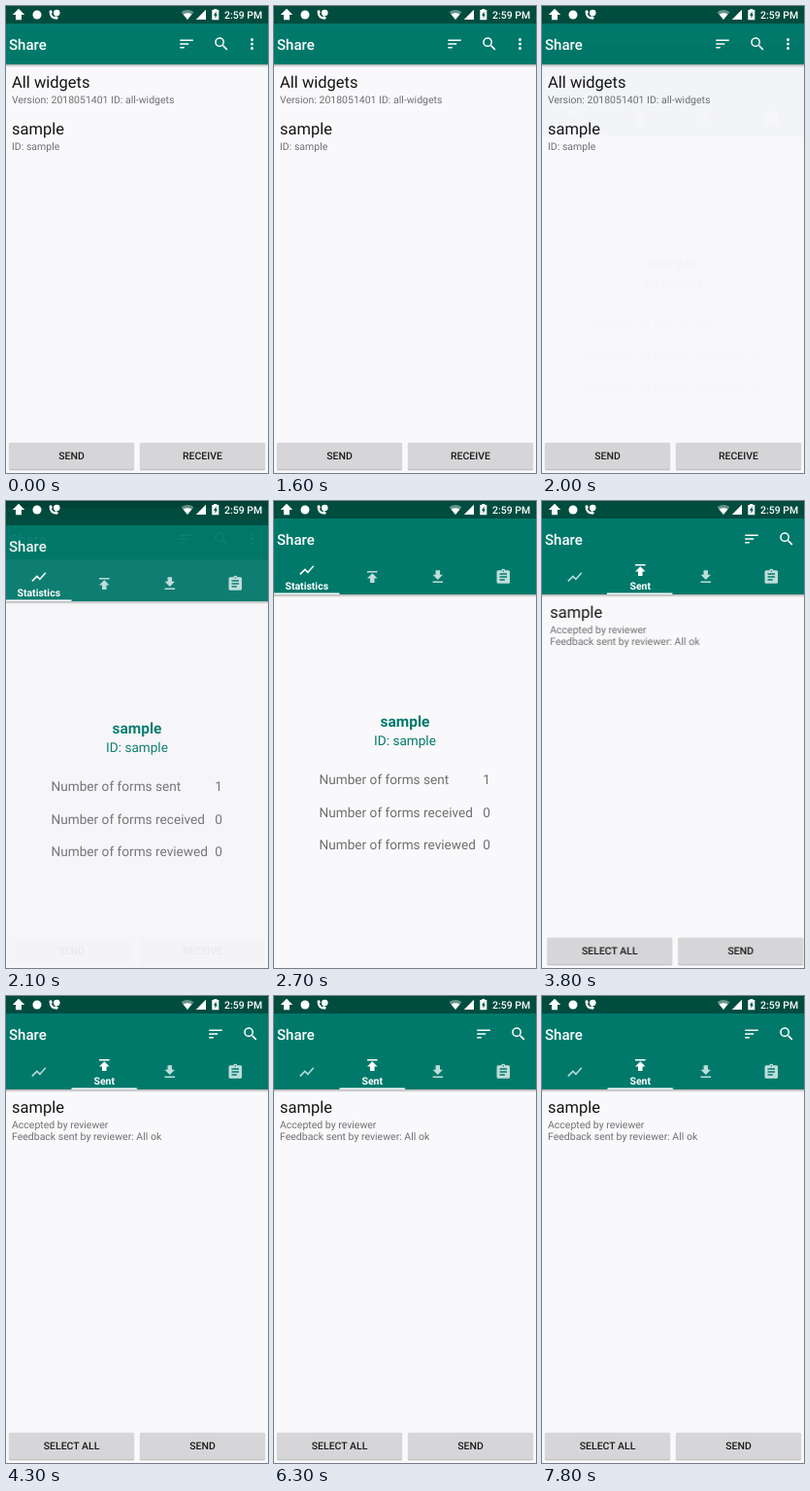
An HTML page that plays this animation: 270 px wide and 480 px high, repeating every 8 s.

```html
<!DOCTYPE html>
<html lang="en">
<head>
<meta charset="utf-8">
<title>Share</title>
<style>
  html, body { margin: 0; width: 100%; height: 100%; overflow: hidden; background: #000; }
  svg { display: block; width: 270px; height: 480px; }
  text { font-family: Roboto, sans-serif; text-rendering: geometricPrecision; fill: #707072; font-size: 10.5px; }
  .title { font-size: 15px; font-weight: 500; fill: #fff; }
  .name { font-size: 16.5px; fill: #151516; }
  .head { font-size: 15.5px; font-weight: 700; fill: #00796b; }
  .id { font-size: 13.6px; fill: #00796b; }
  .stat { font-size: 13.65px; }
  .label { font-weight: 700; fill: #fff; }
  .btn { font-weight: 500; fill: #1a1a1b; }
  .clock { font-weight: 500; fill: #fff; }
  .mid { text-anchor: middle; }
  .icon { fill: #fff; }
  .dim { fill: #fff; fill-opacity: .75; }

  .list, .rows, .detail, .pages, .bar, .before, .after, .menu { animation: 8s linear infinite; }
  .list { animation-name: recede; }
  .rows { animation-name: clear; animation-timing-function: step-end; }
  .detail { animation-name: rise, appear; animation-duration: 8s; }
  .pages { animation-name: swipe; }
  .bar { animation-name: slide; }
  .before { animation-name: hide; animation-timing-function: step-end; }
  .after { animation-name: show; animation-timing-function: step-end; }
  .menu { animation-name: menu; animation-timing-function: step-end; }

  @keyframes recede { 0%, 25% { opacity: 1 } 27.7%, 100% { opacity: .7 } }
  @keyframes clear { 0% { opacity: 1 } 26%, 100% { opacity: 0 } }
  @keyframes rise {
    0%, 25% { transform: translateY(38.4px); animation-timing-function: cubic-bezier(.22, 1, .36, 1) }
    29.375%, 100% { transform: translateY(0) }
  }
  @keyframes appear {
    0%, 25% { opacity: 0; animation-timing-function: cubic-bezier(.25, 1, .5, 1) }
    27.5%, 100% { opacity: 1 }
  }
  @keyframes swipe {
    0%, 40% { transform: translateX(0); animation-timing-function: cubic-bezier(.5, 0, .8, .6) }
    43.75% { transform: translateX(-131.5px); animation-timing-function: cubic-bezier(.22, 1, .36, 1) }
    50%, 100% { transform: translateX(-270px) }
  }
  @keyframes slide {
    0%, 40% { transform: translateX(0); animation-timing-function: cubic-bezier(.5, 0, .8, .6) }
    43.75% { transform: translateX(28.3px); animation-timing-function: cubic-bezier(.22, 1, .36, 1) }
    50%, 100% { transform: translateX(67.5px) }
  }
  @keyframes hide { 0% { opacity: 1 } 43.7%, 100% { opacity: 0 } }
  @keyframes show { 0% { opacity: 0 } 43.7%, 100% { opacity: 1 } }
  @keyframes menu { 0% { opacity: 0 } 44.9%, 100% { opacity: 1 } }
</style>
</head>
<body>
<svg viewBox="0 0 270 480">
  <defs>
    <linearGradient id="shade" x2="0" y2="1">
      <stop offset="0" stop-color="#000" stop-opacity=".3"/>
      <stop offset="1" stop-color="#000" stop-opacity="0"/>
    </linearGradient>
    <path id="sort" transform="scale(.75)" d="M3 18h6v-2H3zM3 6v2h18V6zM3 13h12v-2H3z"/>
    <path id="search" transform="scale(.75)" d="M15.5 14h-.8l-.3-.3a6.5 6.5 0 1 0-.7.7l.3.3v.8l5 5 1.5-1.5zM9.500 14a4.500 4.500 0 1 1 0-9 4.500 4.500 0 0 1 0 9z"/>
    <path id="more" transform="scale(.75)" d="M10 6a2 2 0 1 0 4 0 2 2 0 1 0-4 0M10 12a2 2 0 1 0 4 0 2 2 0 1 0-4 0M10 18a2 2 0 1 0 4 0 2 2 0 1 0-4 0"/>
    <path id="chart" transform="scale(.75)" d="M3.5 18.500l6-6 4 4L22 6.900l-1.400-1.400-7.100 8-4-4L2 17z"/>
    <path id="up" transform="scale(.75)" d="M5 4v2h14V4zM5 14h4v6h6v-6h4l-7-7z"/>
    <path id="down" transform="scale(.75)" d="M19 9h-4V3H9v6H5l7 7zM5 18v2h14v-2z"/>
    <path id="board" transform="scale(.75)" fill-rule="evenodd" d="M19 3h-4.200a3 3 0 0 0-5.600 0H5a2 2 0 0 0-2 2v14a2 2 0 0 0 2 2h14a2 2 0 0 0 2-2V5a2 2 0 0 0-2-2zM12 3a1 1 0 1 1 0 2 1 1 0 0 1 0-2zM14 17H7v-2h7zM17 13H7v-2h10zM17 9H7V7h10z"/>
    <g id="button">
      <rect x="2.700" y="449.500" width="129.600" height="28.300" rx="2" fill="#000" opacity=".1"/>
      <rect x="3" y="449" width="129" height="28" rx="1.500" fill="#000" opacity=".16"/>
      <rect x="3" y="448.700" width="129" height="27.600" rx="1.500" fill="#d6d5d7"/>
    </g>
  </defs>

  <rect width="270" height="480"/>

  <g class="list">
    <rect width="270" height="480" fill="#f9f8fb"/>
    <rect y="60" width="270" height="3" fill="url(#shade)"/>
    <rect width="270" height="60" fill="#00796b"/>
    <rect width="270" height="18" fill="#004d40"/>
    <text class="title" x="3" y="45">Share</text>
    <g class="icon">
      <use href="#sort" x="177" y="30"/>
      <use href="#search" x="213" y="30"/>
      <use href="#more" x="244.500" y="30"/>
    </g>
    <g class="rows">
      <text class="name" x="6" y="83.800">All widgets</text>
      <text x="6" y="99.500">Version: 2018051401 ID: all-widgets</text>
      <text class="name" x="6" y="132.300">sample</text>
      <text x="6" y="148">ID: sample</text>
    </g>
    <use href="#button"/>
    <use href="#button" x="135"/>
    <text class="btn mid" x="67.500" y="466.300">SEND</text>
    <text class="btn mid" x="202.500" y="466.300">RECEIVE</text>
  </g>

  <g class="detail">
    <rect width="270" height="480" fill="#f9f8fa"/>
    <g class="pages">
      <text class="head mid" x="135" y="231.500">sample</text>
      <text class="id mid" x="135" y="250.500">ID: sample</text>
      <text class="stat" x="46.500" y="291.300">Number of forms sent</text>
      <text class="stat" x="215.300" y="291.300">1</text>
      <text class="stat" x="46.500" y="324.700">Number of forms received</text>
      <text class="stat" x="215.300" y="324.700">0</text>
      <text class="stat" x="46.500" y="358.100">Number of forms reviewed</text>
      <text class="stat" x="215.300" y="358.100">0</text>
      <g transform="translate(270)">
        <text class="name" x="6" y="119.800">sample</text>
        <text x="6" y="135.500">Accepted by reviewer</text>
        <text x="6" y="147.800">Feedback sent by reviewer: All ok</text>
        <use href="#button"/>
        <use href="#button" x="135"/>
        <text class="btn mid" x="67.500" y="466.300">SELECT ALL</text>
        <text class="btn mid" x="202.500" y="466.300">SEND</text>
      </g>
    </g>
    <rect y="96" width="270" height="3" fill="url(#shade)"/>
    <rect width="270" height="96" fill="#00796b"/>
    <rect width="270" height="18" fill="#004d40"/>
    <text class="title" x="3" y="45">Share</text>
    <g class="icon menu">
      <use href="#sort" x="207" y="30"/>
      <use href="#search" x="243" y="30"/>
    </g>
    <g class="before">
      <use class="icon" href="#chart" x="24.800" y="62"/>
      <text class="label mid" x="33.750" y="91.200">Statistics</text>
      <use class="dim" href="#up" x="92.300" y="69"/>
    </g>
    <g class="after">
      <use class="dim" href="#chart" x="24.800" y="69"/>
      <use class="icon" href="#up" x="92.300" y="62"/>
      <text class="label mid" x="101.250" y="91.200">Sent</text>
    </g>
    <use class="dim" href="#down" x="159.800" y="69"/>
    <use class="dim" href="#board" x="227.300" y="69"/>
    <rect class="bar" y="94.500" width="67.500" height="1.500" fill="#fff"/>
  </g>

  <g class="icon">
    <path d="M13 2.800l6.200 6.200h-3.200v5.200h-6V9H6.800z"/>
    <circle cx="32" cy="9" r="4.500"/>
    <path d="M44.500 5l2-1 1.600 2.700-1.300 1.300q1 2.300 3.200 3.200l1.400-1.200 2.500 1.700-1 2.100q-8.500 0-8.400-8.800z"/>
    <circle cx="52.300" cy="7" r="3.300"/>
    <path d="M180.500 6.200q6.500-4.400 13 0L187 14z" opacity=".4"/>
    <path d="M182.500 8.600q4.500-2.800 9 0L187 14z"/>
    <path d="M206 3.800v10.200h-10.200z"/>
    <path fill-rule="evenodd" d="M214.300 3h3v1h2v10.200h-7V4h2zM216.500 5.500l-2.500 4.300h1.500v3l2.400-4.300h-1.400z"/>
    <text class="clock" x="225" y="13">2:59 PM</text>
  </g>
</svg>
</body>
</html>
```
